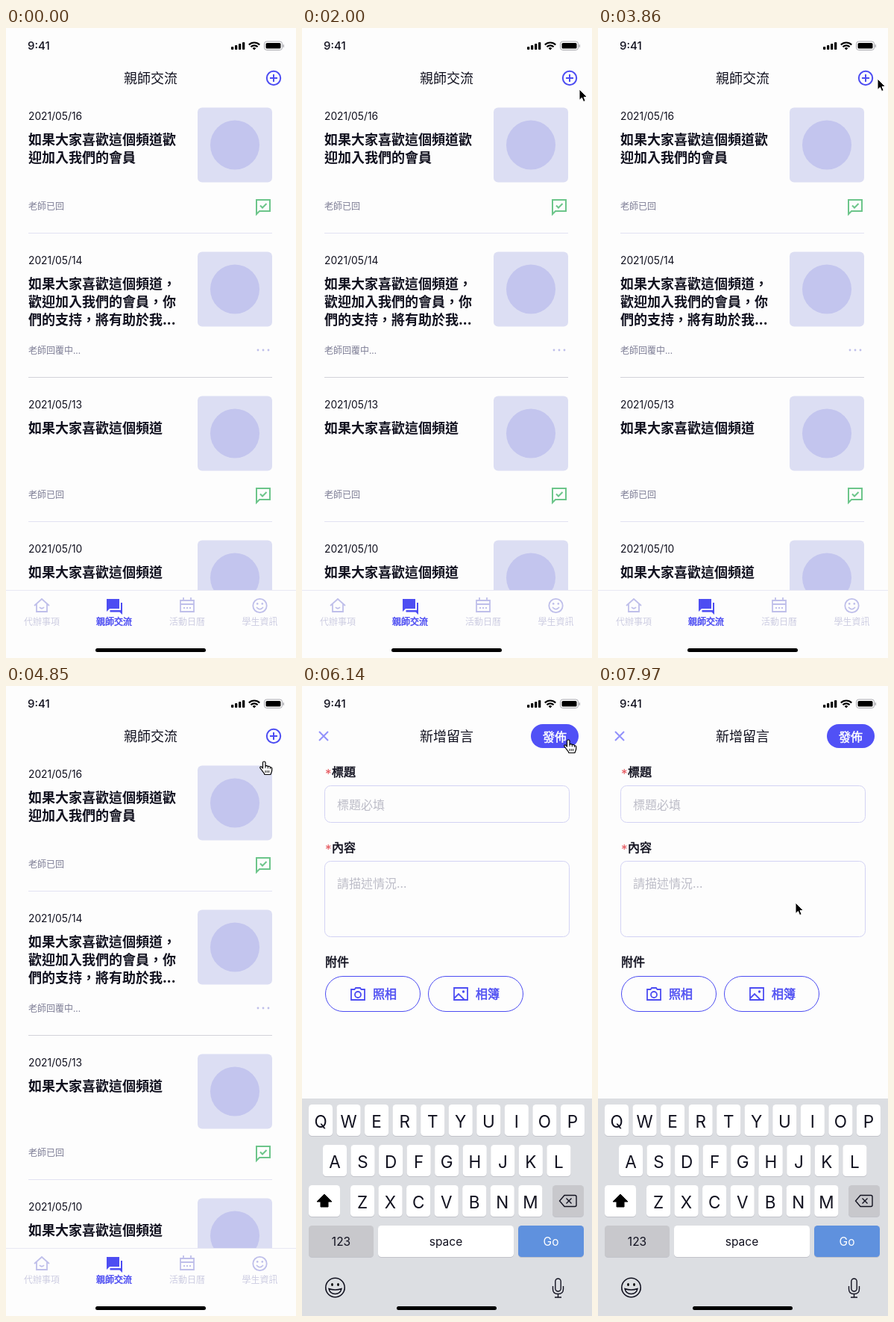
Recreate the animation shown at these times as an HTML page. Size 389x843 px, loop 8 s.

```html
<!DOCTYPE html>
<html lang="zh-Hant">
<head>
<meta charset="utf-8">
<title>親師交流</title>
<style>
html, body { margin: 0; width: 100%; height: 100%; overflow: hidden; background: #fdfdfd; }
svg { display: block; width: 100vw; height: 100vh; }
text { font-family: "Noto Sans CJK TC", "Noto Sans CJK", sans-serif; fill: currentColor; color: #11111f; }
.latin { font-family: Inter, sans-serif; }
.semi { font-weight: 500; }
.bold { font-weight: 700; }
.medium { stroke: currentColor; stroke-width: .55px; }
.mid { text-anchor: middle; }
.note { color: #7e7e96; }
.hint { color: #bdbdc8; }
.blue { color: #4d4df2; }
.pale { color: #cdcde2; }
.white { color: #fff; }
.red { color: #e5555c; }
.line { fill: none; stroke-width: 2; }

#list, #form, #cursor, #arrow, #hand { animation: 8s infinite; }
#list { animation-name: leave; animation-timing-function: step-end; }
#form { animation-name: enter; animation-timing-function: step-end; }
#cursor { animation-name: move; animation-timing-function: ease-in-out; }
#arrow { animation-name: arrow; animation-timing-function: step-end; }
#hand { animation-name: hand; animation-timing-function: step-end; }
@keyframes leave { 0% { visibility: visible } 75%, 100% { visibility: hidden } }
@keyframes enter { 0% { visibility: hidden } 75%, 100% { visibility: visible } }
@keyframes arrow {
  0% { visibility: hidden } 21% { visibility: visible }
  50.3% { visibility: hidden } 86%, 100% { visibility: visible }
}
@keyframes hand {
  0% { visibility: hidden } 50.3% { visibility: visible } 86%, 100% { visibility: hidden }
}
@keyframes move {
  0%, 21% { transform: translate(389px, 96px) }
  25%, 31.4% { transform: translate(372px, 82px) }
  37%, 41% { transform: translate(377px, 75px) }
  46%, 48.5% { transform: translate(375px, 68px) }
  51.7%, 54% { transform: translate(359px, 72px) }
  60%, 63% { transform: translate(347px, 101px) }
  71%, 83% { transform: translate(358px, 72px) }
  99%, 100% { transform: translate(265px, 290px) }
}
</style>
</head>
<body>
<svg id="stage" viewBox="0 0 389 843"></svg>
<script>
// Text is placed by the vertical centre of its glyph box.
const text = (x, cy, size, str, cls = '') =>
  `<text x="${x}" y="${cy + size * 0.38}" font-size="${size}" class="${cls}">${str}</text>`;
const rect = (x, y, w, h, r, fill, extra = '') =>
  `<rect x="${x}" y="${y}" width="${w}" height="${h}" rx="${r}" fill="${fill}" ${extra}/>`;
const circle = (x, y, r, fill, extra = '') =>
  `<circle cx="${x}" cy="${y}" r="${r}" fill="${fill}" ${extra}/>`;
const path = (d, stroke, extra = '') => `<path class="line" d="${d}" stroke="${stroke}" ${extra}/>`;
const at = (x, y, body) => `<g transform="translate(${x} ${y})">${body}</g>`;

const BG = '#fdfdfd', BLUE = '#4d4df2', LILAC = '#bfbfea', TILE = '#dcdef3', GREEN = '#6cc58a';
const INK = '#11111f', GREY_KEY = '#c8c8cc';

function statusBar() {
  const bars = [4, 6, 8, 10].map((h, i) => rect(302 + i * 5, 29 - h, 3.3, h, 1, '#000')).join('');
  const wifi = at(333, 29,
    path('M-7.2-6.6A10.4 10.4 0 0 1 7.2-6.6M-4.6-3.8A6.6 6.6 0 0 1 4.6-3.8', '#000', 'style="stroke-width:2.1"') +
    '<path d="M0 .6L-2.4-1.9A3.5 3.5 0 0 1 2.4-1.9Z"/>');
  const battery = rect(346.5, 18, 24, 11.5, 3.2, 'none', 'stroke="#a8a8ae"') +
    rect(348.5, 20, 20, 7.5, 1.6, '#000') + rect(371.6, 22, 1.4, 4, .7, '#a8a8ae');
  return text(29, 23.2, 15, '9:41', 'latin semi') + bars + wifi + battery;
}

function post(i, date, lines, done) {
  const status = done
    ? text(30, 131.5, 12, '老師已回', 'note') +
      path('M336 123.5H354V138.5H340L336 142.5ZM341 131L344 134L349.5 128.5', GREEN)
    : text(30, 131.5, 12, '老師回覆中...', 'note') +
      [338, 345, 352].map(x => circle(x, 131.5, 1.4, LILAC)).join('');
  const rule = rect(30, 167.5, 327, 1, 0, i === 1 ? '#d2d2da' : '#e2e2f2');
  return at(0, 106.5 + i * 193,
    text(30, 11.5, 13.8, date, 'latin') +
    lines.map((s, n) => text(30, 43 + n * 24, 18, s, 'bold')).join('') +
    rect(257, 0, 100, 100, 6, TILE) + circle(307, 50, 33, '#c3c5ee') + status + rule);
}

function tabBar() {
  const home = path('M-10 1L0-8L10 1M-7-1V9H7V-1M-3 3Q0 6.5 3 3', LILAC, 'style="stroke-width:1.8"');
  const chat = `<path class="blue" fill="currentColor" d="M-10-8H7V5H-6L-10 9ZM9-3H11V13L7.5 9.5H-5.5V7H9Z"/>`;
  const days = path('M-9-6H9V9H-9ZM-9-1H9M-5-10V-5M5-10V-5', LILAC, 'style="stroke-width:1.8"') +
    [-4, 0, 4].map(x => rect(x - 1, 3, 2, 2, 0, LILAC)).join('');
  const face = circle(0, 1, 9.2, 'none', `stroke="${LILAC}" stroke-width="1.8"`) +
    circle(-3.3, -1.6, 1.3, LILAC) + circle(3.3, -1.6, 1.3, LILAC) +
    path('M-4.5 3Q0 8.5 4.5 3', LILAC, 'style="stroke-width:1.6"');
  const tabs = [[48, home, '代辦事項'], [145, chat, '親師交流'], [243, days, '活動日曆'], [340.5, face, '學生資訊']];
  return rect(0, 752, 389, 91, 0, BG) + rect(0, 752, 389, 1, 0, '#e8e8f4') +
    tabs.map(([x, icon, label], i) => at(x, 772, icon) +
      text(x, 794.7, 12, label, i === 1 ? 'mid blue medium' : 'mid pale')).join('') +
    rect(120, 830, 148, 5, 2.5, '#000');
}

function listScreen() {
  const title = '如果大家喜歡這個頻道';
  return statusBar() + text(194, 67, 18, '親師交流', 'mid') +
    circle(359, 67, 9.2, 'none', `stroke="${BLUE}" stroke-width="2"`) + path('M354 67H364M359 62V72', BLUE) +
    post(0, '2021/05/16', [title + '歡', '迎加入我們的會員'], true) +
    post(1, '2021/05/14', [title + '，', '歡迎加入我們的會員，你', '們的支持，將有助於我...'], false) +
    post(2, '2021/05/13', [title], true) +
    post(3, '2021/05/10', [title], true) + tabBar();
}

function keyboard() {
  const key = (x, y, w, fill = '#fff') =>
    rect(x, y + 1, w, 42, 4.6, '#c2c3ca') + rect(x, y, w, 42, 4.6, fill);
  const letters = [['QWERTYUIOP', 25, 560], ['ASDFGHJKL', 44, 614], ['ZXCVBNM', 81, 668]]
    .map(([row, x0, y]) => [...row].map((c, i) => {
      const x = x0 + i * 37.55;
      return key(x - 16, y, 32) + text(x, y + 22, 22.5, c, 'latin mid');
    }).join('')).join('');
  const shift = key(9, 668, 42) + '<path d="M30 680L40 690H35V697H25V690H20Z" stroke="#000" stroke-linejoin="round"/>';
  const erase = key(336, 668, 42, GREY_KEY) +
    path('M352 681.5H366Q368 681.5 368 683.5V694.5Q368 696.5 366 696.5H352L345.5 689ZM354.5 685.5L361.5 692.5M361.5 685.5L354.5 692.5', INK, 'style="stroke-width:1.4"');
  const emoji = at(44.5, 805,
    circle(0, 0, 12.7, 'none', `stroke="${INK}" stroke-width="1.6"`) +
    `<ellipse cx="-4" cy="-4" rx="1.4" ry="2"/><ellipse cx="4" cy="-4" rx="1.4" ry="2"/>` +
    path('M-8.5 1.5Q0 4.5 8.5 1.5Q7 8.5 0 8.5T-8.5 1.5Z', INK, 'style="stroke-width:1.4"'));
  const mic = at(343.5, 805,
    rect(-3.7, -12, 7.4, 17, 3.7, 'none', `stroke="${INK}" stroke-width="1.4"`) +
    path('M-7-2V2Q-7 8.5 0 8.5T7 2V-2M0 8.5V13M-4.5 13H4.5', INK, 'style="stroke-width:1.4"'));
  return rect(0, 552, 389, 291, 0, '#dcdee2') + letters + shift + erase +
    key(9, 722, 87, GREY_KEY) + text(52.5, 743, 15.5, '123', 'latin mid') +
    key(102, 722, 182) + text(193, 743, 15.5, 'space', 'latin mid') +
    key(290, 722, 88, '#5f91de') + text(334, 743, 15.5, 'Go', 'latin mid white') +
    emoji + mic + rect(127, 830, 134, 5, 2.5, '#000');
}

function formScreen() {
  const field = (y, h) => rect(30.5, y, 328, h, 8, BG, 'stroke="#d3d3f4"');
  const label = (y, s) => text(31, y + 3, 17, '*', 'latin red') + text(40, y, 16, s, 'medium');
  const button = (x, icon, s) => rect(x + .5, 388.5, 127, 47, 23.5, BG, `stroke="${BLUE}"`) +
    at(x + 44, 412, icon) + text(x + 64, 412, 16, s, 'blue medium');
  const camera = path('M-9-6H-4.5L-3-8H3L4.5-6H9V8H-9Z', BLUE, 'style="stroke-width:1.8"') +
    circle(0, 1, 4, 'none', `stroke="${BLUE}" stroke-width="1.8"`);
  const photo = path('M-9-8H9V8H-9ZM-9 6L-3 0L5 8', BLUE, 'style="stroke-width:1.8"') + circle(3.5, -3, 1.7, BLUE);
  return rect(0, 0, 389, 843, 0, BG) + statusBar() +
    path('M23 61L35 73M35 61L23 73', '#9292fb') + text(194, 67, 18, '新增留言', 'mid') +
    rect(307, 51, 64, 32, 16, '#5151f6') + text(339, 67.5, 16, '發佈', 'mid white medium') +
    label(114.5, '標題') + field(133.5, 49) + text(47, 158.5, 16, '標題必填', 'hint') +
    label(215.5, '內容') + field(234.5, 101) + text(47, 263.5, 16, '請描述情況...', 'hint') +
    text(31, 368.5, 16, '附件', 'medium') +
    button(31, camera, '照相') + button(169, photo, '相簿') + keyboard();
}

const arrow = '<path id="arrow" d="M0 0V14.5L3.4 11.4L5.6 16.6L8.2 15.5L6 10.5H10.5Z" stroke="#fff" stroke-width="1"/>';
const hand = `<g id="hand" fill="#fff" stroke="#000" stroke-width="1.2" stroke-linejoin="round">
  <path d="M-2.5 1.5C-2.5-.5 1-.5 1 1.5V6.5C1.5 5.3 4 5.4 4.3 7C5.2 6 7.2 6.4 7.4 8C8.5 7.4 9.7 8 9.7 9.5V12C9.7 14 8.5 15 8 17.5H0C-.5 15.5-2 14-3.3 12.5L-6 8.8C-6.8 7-4.8 6.2-3.8 7.5L-2.5 9Z"/>
  <path fill="none" d="M1 6.5V9M4.3 7V9.5M7.4 8V10M1 12V15M3.3 12V15M5.6 12V15" stroke-width=".9"/></g>`;

document.getElementById('stage').innerHTML =
  `<g id="list">${listScreen()}</g><g id="form">${formScreen()}</g><g id="cursor">${arrow}${hand}</g>`;
</script>
</body>
</html>
```
